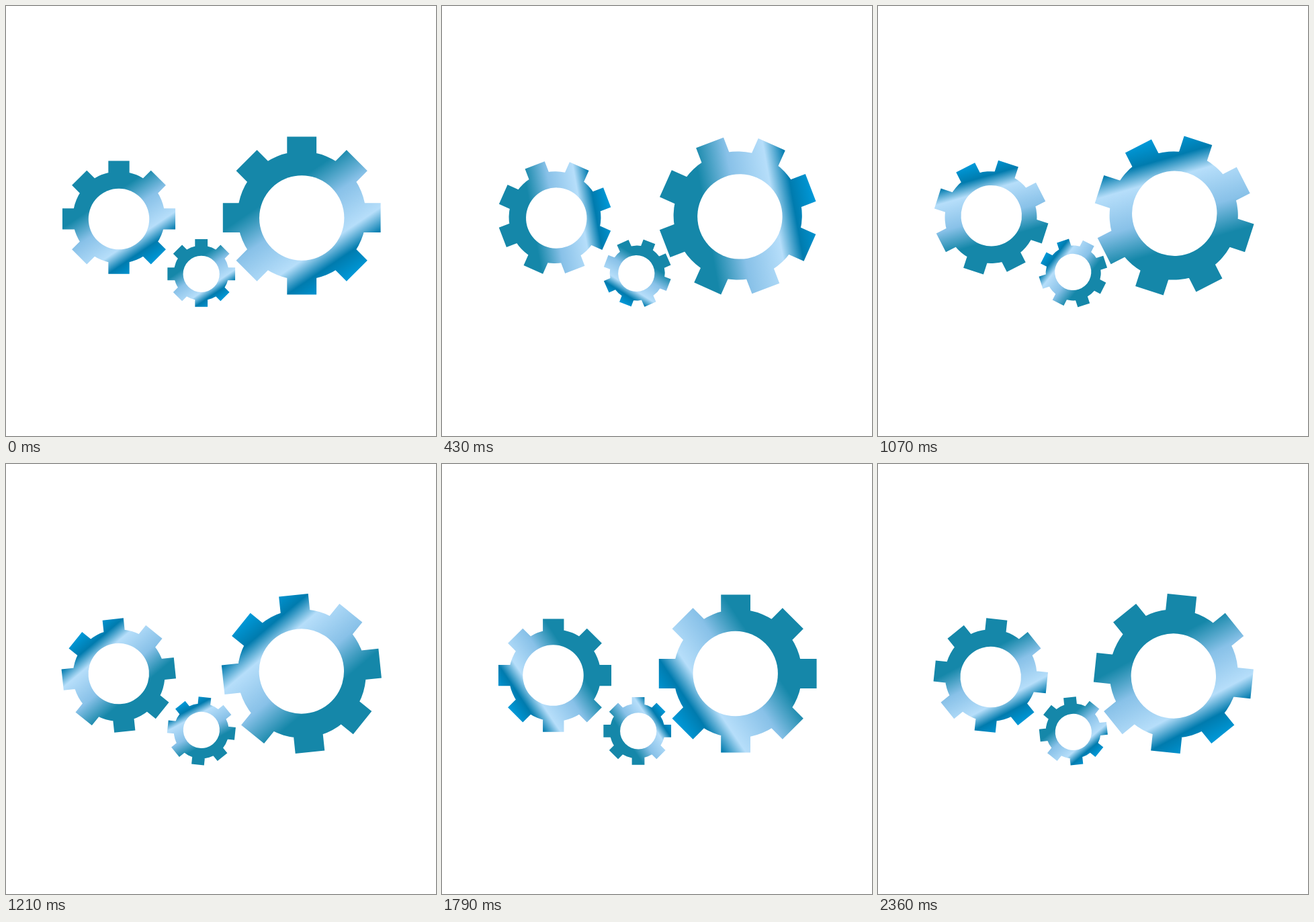
An HTML page that plays this animation: 640x640 px, repeating every 2.43 s.

```html
<!DOCTYPE html>
<html lang="en">
<head>
<meta charset="utf-8">
<title>Turning gears</title>
<style>
  html, body { margin: 0; width: 100%; height: 100%; overflow: hidden; background: #fff; }
  svg { display: block; width: 100vw; height: 100vh; }
</style>
</head>
<body>
<svg viewBox="0 0 640 640">
  <defs>
    <linearGradient id="steel" gradientUnits="userSpaceOnUse" x1="-66" y1="-97.8" x2="66" y2="97.8">
      <stop offset=".3" stop-color="#1587a9"/>
      <stop offset=".5" stop-color="#88c1e8"/>
      <stop offset=".735" stop-color="#b6defa"/>
      <stop offset=".86" stop-color="#007bae"/>
      <stop offset="1" stop-color="#009ada"/>
    </linearGradient>
    <g id="gear">
      <path id="body" fill="url(#steel)"/>
      <circle cy="3.5" r="63.2" fill="#fff"/>
    </g>
  </defs>
</svg>
<script>
const NS = "http://www.w3.org/2000/svg";
const LOOP = 2430, FPS = 14, STEP_FPS = 25, STEP_DEG = 6;
const HALF = 21.9, INNER = 80, RING = 95.6;

// x, y, scale, direction
const GEARS = [
  [168, 314.6, 0.716, -1],
  [440.2, 312, 1, -1],
  [290.7, 397.4, 0.429, 1]
];

// A tooth pointing outwards at the given angle; shift moves it down
function tooth(deg, tip, shift) {
  const a = deg * Math.PI / 180, c = Math.cos(a), s = Math.sin(a);
  const corners = [[INNER, -HALF], [tip, -HALF], [tip, HALF], [INNER, HALF]];
  return "M" + corners.map(([r, w]) =>
    (r * c - w * s).toFixed(2) + " " + (r * s + w * c + shift).toFixed(2)).join("L") + "Z";
}

let d = `M${-RING} 0A${RING} ${RING} 0 0 1 ${RING} 0A${RING} ${RING} 0 0 1 ${-RING} 0Z`;
for (let deg = 0; deg < 360; deg += 45) {
  d += tooth(deg, deg % 90 ? 116.2 : 117.4, deg % 180 ? 0 : 3.1);
}
document.getElementById("body").setAttribute("d", d);

const nodes = GEARS.map(() => {
  const use = document.createElementNS(NS, "use");
  use.setAttribute("href", "#gear");
  return document.querySelector("svg").appendChild(use);
});

function draw() {
  const t = performance.now() % LOOP;
  // Held poses: a 25 fps turn shown at 14 fps
  const k = Math.min(33, Math.floor((t + 5) * FPS / 1000));
  const angle = STEP_DEG * Math.floor((k + 0.5) * STEP_FPS / FPS);
  GEARS.forEach(([x, y, scale, dir], i) => {
    nodes[i].setAttribute("transform",
      `translate(${x} ${y}) rotate(${dir * angle}) scale(${scale})`);
  });
  requestAnimationFrame(draw);
}
draw();
</script>
</body>
</html>
```
